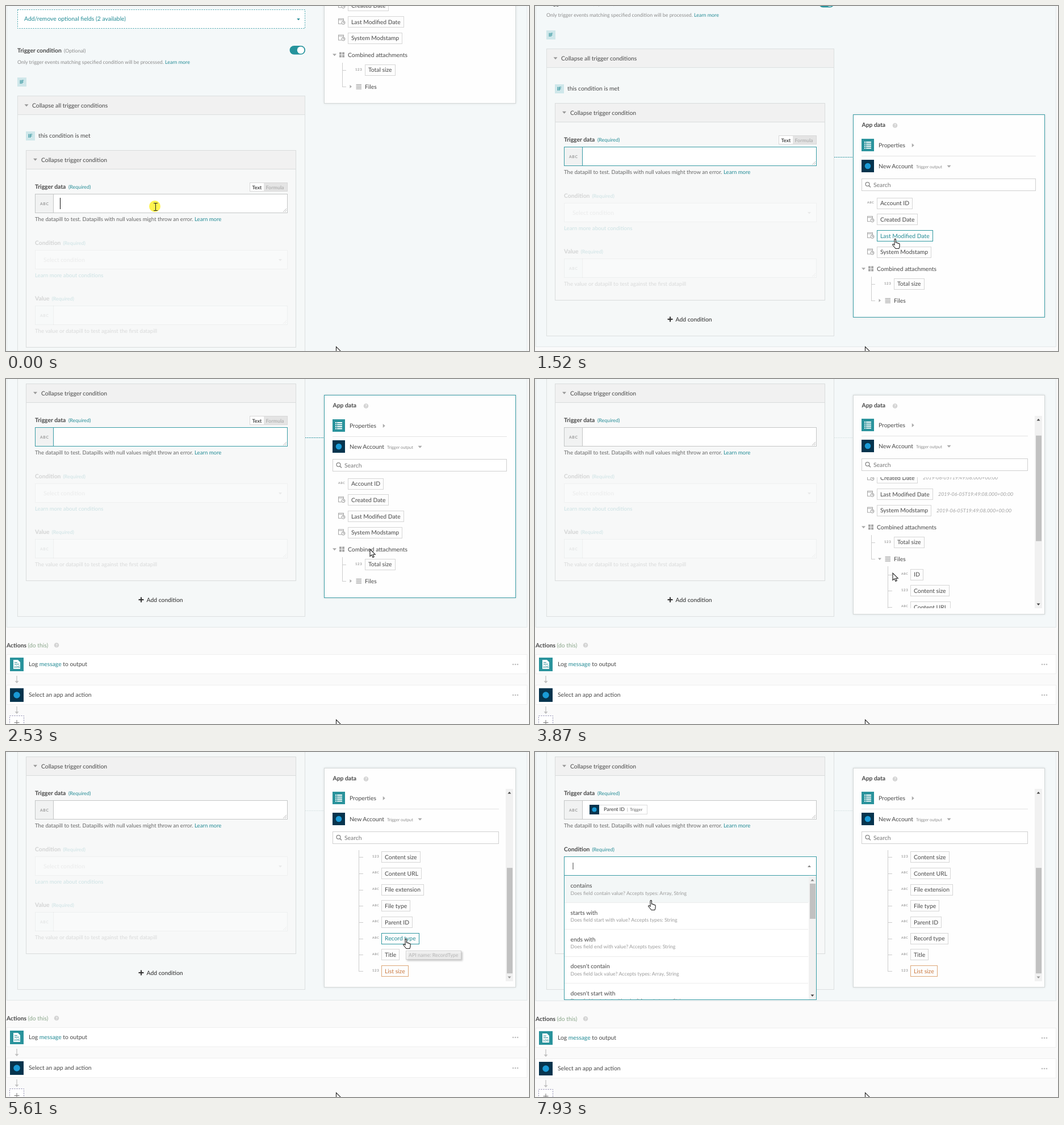
These frames come from a looping animation (921 by 608 pixels, 8 s). An HTML page with a canvas:

```html
<!DOCTYPE html>
<html lang="en">
<head>
<meta charset="utf-8">
<style>
  html, body { margin: 0; width: 100%; height: 100%; overflow: hidden; background: #fafafa; }
  canvas { display: block; }
</style>
</head>
<body>
<canvas id="stage" width="921" height="608"></canvas>
<script>
const ctx = document.getElementById('stage').getContext('2d');
const LOOP = 8000;
const BASE = 10.35, HINT = 9.6, SMALL = 8.85, TINY = 7.4;
const TEAL = '#258c96', INK = '#484848', GREY = '#8c8c8c', PALE = '#b5b5b5', EDGE = '#d9dcdc', NAVY = '#06344e';

// ---- timing ----
const ease = (t, a, b) => {
  const p = Math.min(1, Math.max(0, (t - a) / (b - a)));
  return p * p * (3 - 2 * p);
};
const within = (t, a, b) => t >= a && t < b;

const POINTER = [
  [90, 263, 354], [800, 655, 452], [1280, 655, 452], [1480, 634, 410], [2150, 634, 410],
  [2500, 641, 300], [3000, 641, 300], [3290, 607, 352], [3500, 607, 352], [3780, 630, 342],
  [4190, 630, 342], [4480, 637, 336], [4960, 637, 336], [5200, 704, 329], [5720, 704, 329],
  [5970, 690, 303], [6640, 690, 303], [7000, 297, 240], [7070, 290, 236], [7230, 204, 205],
  [7500, 204, 205], [7710, 204, 261]
];
function pointerAt(t) {
  const next = POINTER.findIndex(k => k[0] > t);
  if (next === 0) return POINTER[0].slice(1);
  if (next < 0) return POINTER[POINTER.length - 1].slice(1);
  const [t0, x0, y0] = POINTER[next - 1], [t1, x1, y1] = POINTER[next];
  const p = ease(t, t0, t1);
  return [x0 + (x1 - x0) * p, y0 + (y1 - y0) * p];
}

// ---- drawing helpers ----
function text(s, x, y, size = BASE, color = INK, style = '') {
  ctx.font = `${style} ${size}px Lato, sans-serif`;
  ctx.fillStyle = color;
  ctx.fillText(s, x, y + size * .36);
  return x + ctx.measureText(s).width;
}
function box(x, y, w, h, fill, stroke, dash = []) {
  if (fill) { ctx.fillStyle = fill; ctx.fillRect(x, y, w, h); }
  if (!stroke) return;
  ctx.strokeStyle = stroke;
  ctx.lineWidth = 1;
  ctx.setLineDash(dash);
  ctx.strokeRect(x + .5, y + .5, w - 1, h - 1);
  ctx.setLineDash([]);
}
function line(x1, y1, x2, y2, color = EDGE, width = 1, dash = []) {
  ctx.strokeStyle = color;
  ctx.lineWidth = width;
  ctx.setLineDash(dash);
  ctx.beginPath();
  ctx.moveTo(x1, y1);
  ctx.lineTo(x2, y2);
  ctx.stroke();
  ctx.setLineDash([]);
}
function disc(x, y, r, fill) {
  ctx.fillStyle = fill;
  ctx.beginPath();
  ctx.arc(x, y, r, 0, 7);
  ctx.fill();
}
function triangle(x, y, color = '#999', turn = 0, r = 3.5) {
  ctx.save();
  ctx.translate(x, y);
  ctx.rotate(turn * Math.PI / 2);
  ctx.fillStyle = color;
  ctx.beginPath();
  ctx.moveTo(-r, -r / 2);
  ctx.lineTo(r, -r / 2);
  ctx.lineTo(0, r / 2 + .4);
  ctx.fill();
  ctx.restore();
}
function faded(alpha, draw) {
  ctx.save();
  ctx.globalAlpha = alpha;
  draw();
  ctx.restore();
}
function help(x, y) {
  disc(x, y, 4.3, '#d4d4d4');
  text('?', x - 1.6, y, 7, '#fff', 'bold');
}
function typeTag(s, x, y, size = 6) {
  ctx.letterSpacing = '.6px';
  text(s, x, y, size, '#999', 'bold');
  ctx.letterSpacing = '0px';
}
function ifTag(x, y) {
  box(x, y, 16, 16, '#cfe7ea');
  text('IF', x + 4, y + 8, SMALL, TEAL, 'bold');
}
function appTile(x, y, size) {
  box(x, y, size, size, NAVY);
  disc(x + size / 2, y + size / 2, size * .24, '#1a9bd7');
}
function listTile(x, y) {
  box(x, y, 22, 22, '#2a939c');
  for (let i = 0; i < 4; i++) {
    box(x + 5, y + 5 + i * 3.5, 2, 2, '#fff');
    box(x + 8, y + 5 + i * 3.5, 9, 2, '#fff');
  }
}
function logTile(x, y) {
  box(x, y, 24, 24, '#2a939c');
  ctx.fillStyle = '#fff';
  ctx.beginPath();
  for (const [px, py] of [[6, 4], [14, 4], [18, 8], [18, 20], [6, 20]]) ctx.lineTo(x + px, y + py);
  ctx.fill();
  line(x + 8, y + 8.5, x + 13, y + 8.5, TEAL);
  line(x + 8, y + 11.5, x + 16, y + 11.5, TEAL);
  text('LOG', x + 7.2, y + 16, 5, TEAL, 'bold');
}
function calendar(x, y) {
  box(x - 6, y - 5, 10, 10, null, '#a5a5a5');
  line(x - 6, y - 2.5, x + 4, y - 2.5, '#a5a5a5');
  disc(x + 3, y + 2.5, 3.6, '#fdfdfd');
  ctx.strokeStyle = '#999';
  ctx.beginPath();
  ctx.arc(x + 3, y + 2.5, 3, 0, 7);
  ctx.moveTo(x + 3, y + .5);
  ctx.lineTo(x + 3, y + 2.5);
  ctx.lineTo(x + 5, y + 2.5);
  ctx.stroke();
}
function grip(x, y) {
  line(x - 6, y, x, y - 6, '#aaa', .8);
  line(x - 3, y, x, y - 3, '#aaa', .8);
}
function textField(y, border) {
  box(51, y, 445, 34, '#fff', border);
  box(52, y + 1, 31, 32, '#f1f2f2');
  line(83.5, y, 83.5, y + 34, border);
  typeTag('ABC', 60, y + 17.5, 6.8);
  grip(494, y + 32);
}
function selectField() {
  box(51, 430, 445, 34, '#fff', '#ccc');
  text('Select condition', 66, 447, BASE, PALE);
  triangle(483, 447.5, '#aaa', 0, 3);
}
function scrollbar(x, top, bottom, thumbTop, thumbHeight, upColor, downColor) {
  box(x, top, 13, bottom - top, '#f1f1f1');
  box(x + 2, thumbTop, 10, thumbHeight, '#c1c1c1');
  triangle(x + 6.5, top + 7, upColor, 2, 3);
  triangle(x + 6.5, bottom - 7, downColor, 0, 3);
}

// ---- page ----
function drawPage(s) {
  const drop = s.menuOpen ? 1 : 0;
  box(1, -20, 917, 704 + drop, '#f4f8f9', '#e3e8e9');

  box(20, 6, 507, 34, '#fff', '#3a9ca5', [2, 2]);
  text('Add/remove optional fields (2 available)', 32, 22, BASE, TEAL);
  triangle(515, 23.5, TEAL, 0, 2.8);
  text('Trigger condition', 20, 78, BASE, INK, 'bold');
  text('(Optional)', 102, 78.5, SMALL, GREY);
  ctx.fillStyle = '#25939c';
  ctx.beginPath();
  ctx.roundRect(499.5, 70, 27.5, 15.5, 8);
  ctx.fill();
  disc(519, 77.8, 6.3, '#fff');
  const end = text('Only trigger events matching specified condition will be processed. ', 20, 99, SMALL, GREY);
  text('Learn more', end, 99, SMALL, TEAL);
  ifTag(20, 126);

  box(20, 158, 507, 507, '#f5f8f8', '#dce0e0');
  box(20, 158, 507, 34, '#f1f1f1', '#dce0e0');
  triangle(36, 175);
  text('Collapse all trigger conditions', 46, 175);
  ifTag(35, 221);
  text('this condition is met', 57, 228.5);

  box(35, 254, 476, 348, '#f7f8f8', EDGE);
  box(35, 254, 476, 34, '#f1f1f1', EDGE);
  triangle(51.5, 270.5);
  text('Collapse trigger condition', 62, 271);

  text('Trigger data', 51, 318.5, BASE, INK, 'bold');
  text('(Required)', 110, 319, SMALL, TEAL);
  if (s.modeSwitch) {
    box(429, 311, 67, 16, '#e4e4e4', '#d8d8d8');
    box(430, 312, 24, 14, '#fff');
    text('Text', 433.5, 319.5, SMALL, INK, 'bold');
    text('Formula', 457.5, 319.5, SMALL, '#b4b4b4', 'bold');
  }
  textField(331, '#c4c6c6');
  faded(s.focus, () => {
    box(51, 331, 445, 34, null, '#3a9ca5');
    line(83.5, 331, 83.5, 365, '#3a9ca5');
  });
  if (s.filled) {
    box(96, 339, 102, 17, '#fff', '#dcdcdc');
    appTile(96, 339, 17);
    const x = text('Parent ID', 121, 347, SMALL, INK, '500');
    text('|', x + 4, 347, TINY, GREY);
    text('Trigger', x + 9, 347, TINY, '#666');
  }
  if (s.caret) line(s.filled ? 199.5 : 95.5, 338, s.filled ? 199.5 : 95.5, 358, '#111');
  const hintEnd = text('The datapill to test. Datapills with null values might throw an error. ', 51, 376, HINT, '#666');
  text('Learn more', hintEnd, 376, HINT, TEAL);

  faded(s.filled ? 1 : .2, () => {
    text('Condition', 51, 417.5, BASE, INK, 'bold');
    text('(Required)', 100.5, 418, SMALL, TEAL);
    selectField();
    text('Learn more about conditions', 51, 474.5, HINT, TEAL);
  });
  faded(.2, () => {
    text('Value', 51, 515, BASE, INK, 'bold');
    text('(Required)', 80.5, 515.5, SMALL, TEAL);
    textField(528, '#c4c6c6');
    text('The value or datapill to test against the first datapill', 51, 573, HINT, '#666');
  });
  line(233.5, 635, 242.5, 635, '#333', 2);
  line(238, 630.5, 238, 639.5, '#333', 2);
  text('Add condition', 247.5, 635, BASE, '#3a3a3a', '500');

  ctx.save();
  ctx.translate(0, drop);
  const head = text('Actions ', 1, 715, BASE, INK, 'bold');
  text('(do this)', head, 715, BASE, '#8aa68a');
  help(89, 715);
  [731, 785].forEach((y, i) => {
    box(1, y, 917, 35, '#fff', '#efefef');
    if (i) {
      appTile(7, y + 6, 24);
      text('Select an app and action', 40, y + 17.5);
    } else {
      logTile(7, y + 6);
      const a = text('Log ', 40, y + 17.5);
      const b = text('message', a, y + 17.5, BASE, TEAL);
      text(' to output', b, y + 17.5);
    }
    for (let d = 0; d < 3; d++) disc(893 + d * 4, y + 18, 1.3, '#bdbdbd');
    line(19, y + 38, 19, y + 48, '#c8c8c8', 1.4);
    triangle(19, y + 49, '#c0c0c0', 0, 3.5);
  });
  box(6, 839, 26, 26, '#fff', '#8583a8', [2, 2]);
  line(14.5, 851.5, 23.5, 851.5, '#777');
  line(19, 847, 19, 856, '#777');
  ctx.restore();
}

// ---- data panel; local origin at its top edge ----
function pill(s, x, y, label, color = INK, edge = '#d6d6d6') {
  ctx.font = `${BASE}px Lato, sans-serif`;
  const w = Math.round(ctx.measureText(label).width + 12);
  const [px, py] = s.pointer;
  const screenY = y + s.panelY - s.listScroll;
  const hot = s.overList && px > x && px < x + w && Math.abs(py - screenY) < 10;
  if (hot) s.hand = true;
  box(x, Math.round(y - 10), w, 20, '#fdfdfd', hot ? '#2f98a1' : edge);
  text(label, x + 6, y, BASE, hot ? TEAL : color);
  return x + w;
}
function drawList(s) {
  const PITCH = 28.7;
  ['Account ID', 'Created Date', 'Last Modified Date', 'System Modstamp'].forEach((label, i) => {
    const y = 156.5 + i * PITCH;
    if (i) calendar(591, y - 1); else typeTag('ABC', 585, y - 1, 5.2);
    const x = pill(s, 602, y, label);
    if (i && s.expanded) text('2019-06-05T19:49:08.000+00:00', x + 9, y, SMALL, '#a0a0a0', 'italic');
  });
  triangle(578.5, 272, '#aaa');
  for (const dx of [0, 5]) for (const dy of [0, 5]) box(587 + dx, 267.5 + dy, 4, 4, '#a6a6a6');
  text('Combined attachments', 602, 272);
  line(592.5, 286, 592.5, 328, '#ccc');
  line(592, 299.5, 599, 299.5, '#ccc');
  line(592, 328.5, 599, 328.5, '#ccc');
  typeTag('123', 615, 297.5, 6);
  pill(s, 632, 298.5, 'Total size');
  triangle(607, 328, '#aaa', s.expanded ? 0 : -1, 3);
  for (let i = 0; i < 4; i++) line(616.5, 324.5 + i * 2.5, 626, 324.5 + i * 2.5, '#a2a2a2', 1.2);
  text('Files', 632, 328);
  if (!s.expanded) return;
  const fields = ['ID', 'Content size', 'Content URL', 'File extension', 'File type', 'Parent ID', 'Record type', 'Title', 'List size'];
  line(621.5, 341, 621.5, 355.5 + 8 * PITCH, '#ccc');
  fields.forEach((label, i) => {
    const y = 355.5 + i * PITCH, last = i === 8;
    line(621, Math.round(y) + .5, 629, Math.round(y) + .5, '#ccc');
    typeTag(i === 1 || last ? '123' : 'ABC', 645, y - 1.5, i === 1 || last ? 6 : 5.2);
    pill(s, 661, y, label, last ? '#c9783f' : INK, last ? '#dda778' : undefined);
  });
}
function drawPanel(s) {
  ctx.save();
  ctx.translate(0, s.panelY);
  const height = s.expanded ? 387 : 358, right = s.expanded ? 868 : 882;
  ctx.save();
  ctx.shadowColor = 'rgba(0,0,0,.1)';
  ctx.shadowBlur = 4;
  box(560, 0, 338, height, '#fefefe');
  ctx.restore();
  box(560, 0, 338, height, null, '#d3d7d7');
  faded(s.focus, () => box(560, 0, 338, height, null, '#3a9ca5'));
  text('App data', 575.5, 18, BASE, INK, 'bold');
  help(634, 19.5);

  ctx.save();
  if (s.expanded) {
    ctx.beginPath();
    ctx.rect(561, 145, 319, 231);
    ctx.clip();
  }
  ctx.translate(0, -s.listScroll);
  drawList(s);
  ctx.restore();

  ctx.translate(0, s.expanded ? -1 : 0);
  listTile(575, 43);
  text('Properties', 605, 54);
  triangle(665.5, 54.5, '#aaa', -1);
  line(575, 73.5, right, 73.5, '#e3e3e3');
  appTile(575, 80, 22);
  text('New Account', 605, 91);
  text('Trigger output', 671, 92, TINY, GREY);
  triangle(729, 91.5, '#aaa');
  box(575, 113, right - 575, 22, '#fff', '#d0d0d0');
  ctx.strokeStyle = '#888';
  ctx.lineWidth = 1.3;
  ctx.beginPath();
  ctx.arc(585.5, 123, 3.4, 0, 7);
  ctx.stroke();
  line(588, 125.5, 591, 128.5, '#888', 1.5);
  text('Search', 596, 124, BASE, '#777');
  ctx.restore();

  if (s.expanded) scrollbar(880, 65, 404, 78 + s.listScroll * .556, 186, '#444', s.listScroll > 220 ? '#999' : '#444');
}

// ---- condition menu, in stage coordinates ----
function drawMenu(s, t) {
  const items = [
    ['contains', 'contain value? Accepts types: Array, String'],
    ['starts with', 'start with value? Accepts types: String'],
    ['ends with', 'end with value? Accepts types: String'],
    ["doesn't contain", 'lack value? Accepts types: Array, String'],
    ["doesn't start with", 'not start with value? Accepts types: String']
  ];
  box(51, 184, 445, 253, '#fff');
  ctx.save();
  ctx.beginPath();
  ctx.rect(52, 218, 430, 218);
  ctx.clip();
  items.forEach(([title, detail], i) => {
    const y = 218 + i * 47.4;
    if (!i && s.pointer[1] > 218) box(52, y, 430, 47, '#f3f7f7');
    text(title, 62.5, y + 17.5);
    text('Does field ' + detail, 62.5, y + 30.5, SMALL, '#9b9b9b');
    line(52, Math.round(y + 47) + .5, 481, Math.round(y + 47) + .5, '#ececec');
  });
  ctx.restore();
  scrollbar(482, 219, 436, 232, 62, '#888', '#444');
  box(51, 184, 445, 34, '#fff', '#3a9ca5');
  box(51, 184, 445, 253, null, '#3a9ca5');
  triangle(483, 201.5, '#888', 2, 3);
  if ((t - 7390) % 1060 < 580) line(67, 195, 67, 207, '#444');
}

function drawTooltip(label, x, y, alpha) {
  if (alpha <= 0) return;
  faded(alpha, () => {
    ctx.font = `${SMALL}px Lato, sans-serif`;
    const w = Math.round(ctx.measureText(label).width + 11);
    ctx.shadowColor = 'rgba(0,0,0,.35)';
    ctx.shadowBlur = 3;
    ctx.shadowOffsetX = ctx.shadowOffsetY = 2;
    box(x, y, w, 16, '#fff');
    ctx.shadowColor = 'transparent';
    box(x, y, w, 16, null, '#bbb');
    text(label, x + 5, y + 8, SMALL, '#999');
  });
}

const ARROW = new Path2D('M0 0V12.5L3 9.8 5 14.4 7.2 13.4 5.2 9.2H9.2Z');
const HAND = new Path2D('M4 11V1.6a1.2 1.2 0 0 1 2.4 0V7q2-.8 2.4.8 2-.6 2.3.8 2-.3 2 1.4V13q0 2-1.3 4.5H6Q4 15 1 11.5 0 10 1.5 9.7 2.6 9.6 4 11Z');
function drawShape(path, x, y) {
  ctx.save();
  ctx.translate(x, y);
  ctx.fillStyle = '#fff';
  ctx.fill(path);
  ctx.strokeStyle = '#222';
  ctx.lineWidth = 1.1;
  ctx.stroke(path);
  ctx.restore();
}
function drawPointer(s, t) {
  const [x, y] = s.pointer;
  if (t < 110 || [3310, 6210, 7380].some(c => within(t, c, c + 110))) disc(x - 1, y - 1, 10, 'rgba(255,240,20,.75)');
  if (t < 160) {
    line(x + .5, y - 6, x + .5, y + 6, '#222');
    line(x - 3, y - 6.5, x + 4, y - 6.5, '#222');
    line(x - 3, y + 6.5, x + 4, y + 6.5, '#222');
  } else if (s.hand) drawShape(HAND, x - 5, y);
  else drawShape(ARROW, x, y);
}

function draw(t) {
  const scroll = Math.round(83 * ease(t, 560, 960) + 163 * ease(t, 1590, 2060));
  const menuOpen = t >= 7400;
  const s = {
    pointer: pointerAt(t),
    panelY: Math.round(-186 + 460 * ease(t, 80, 480)) - scroll,
    listScroll: Math.round(82 * ease(t, 3803, 3943) + 82 * ease(t, 3940, 4040) + (t >= 4670 ? 63 : 0)),
    focus: t < 5000 ? ease(t, 80, 320) - ease(t, 3350, 3600) : ease(t, 6220, 6420) - ease(t, 7400, 7850),
    expanded: t >= 3350,
    filled: t >= 6250,
    modeSwitch: t < 3350 || within(t, 6230, 7400),
    caret: t < 3350 ? (t + 200) % 1060 < 530 : within(t, 6250, 7400) && (t - 6250) % 1060 < 530,
    overList: t > 800,
    hand: menuOpen || t > 7180 || within(t, 3200, 3600),
    menuOpen
  };
  box(0, 0, 921, 608, '#fafafa');
  ctx.save();
  ctx.translate(0, -scroll);
  drawPage(s);
  faded(.45, () => line(527, 349.5, 560, 349.5, t < 80 ? 'transparent' : '#b9cccd', 1, [2, 1]));
  faded(s.focus, () => line(527, 349.5, 560, 349.5, '#3a9ca5', 1, [2, 1]));
  ctx.restore();
  drawPanel(s);
  if (menuOpen) drawMenu(s, t);
  if (t < 5730) drawTooltip('API name: RecordType', 704, 350, ease(t, 5430, 5730));
  else if (t < 6680) drawTooltip('API name: ParentId', 698, 324, ease(t, 6400, 6680));
  drawShape(ARROW, 581.5, 600.5);
  drawPointer(s, t);
}

ctx.textRendering = 'geometricPrecision';
function tick(now) {
  draw(now % LOOP);
  requestAnimationFrame(tick);
}
draw(0);
requestAnimationFrame(tick);
</script>
</body>
</html>
```
